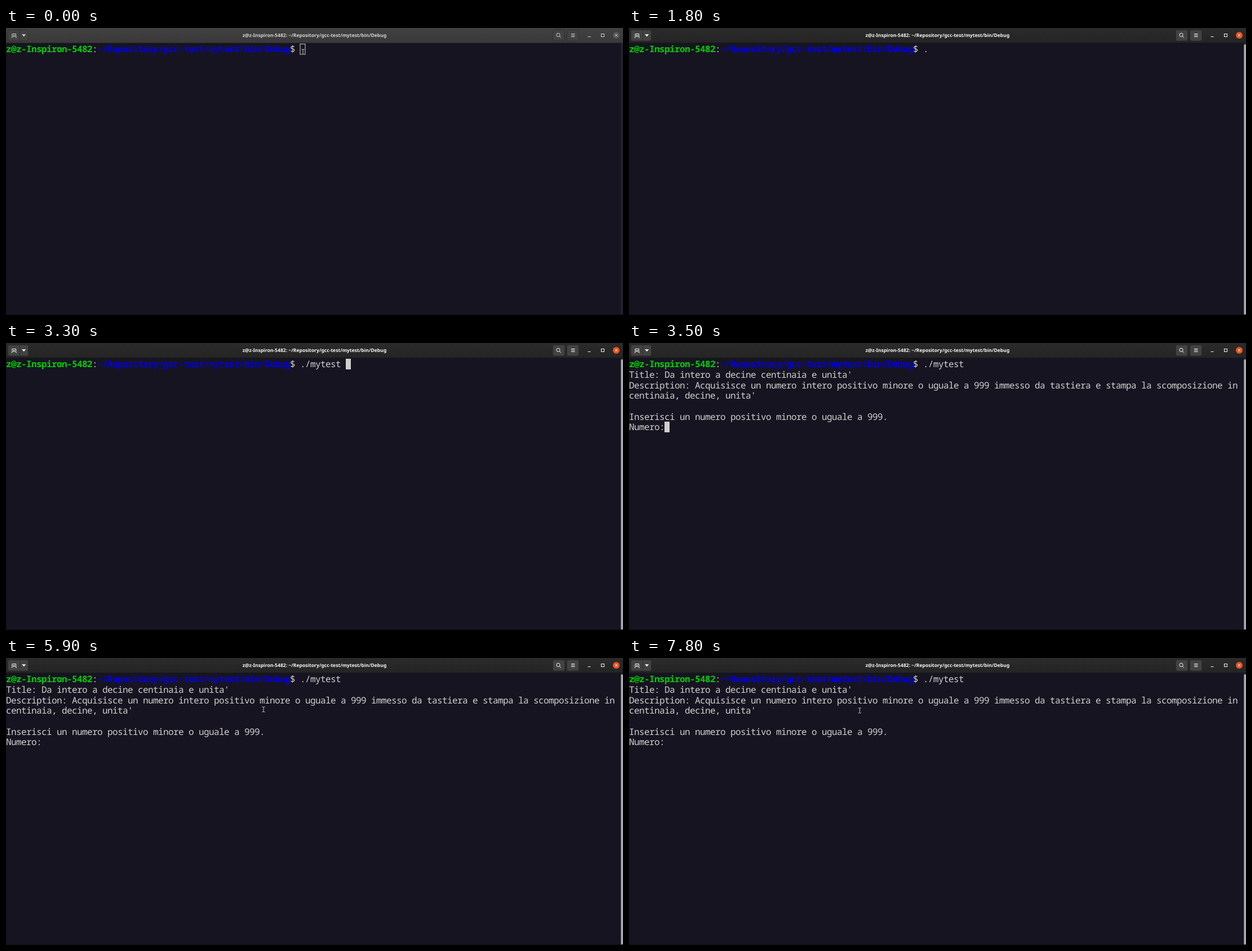
Write an HTML page that moves like this. It is 1095 px wide and 511 px high and loops after 8 s.

```html
<!DOCTYPE html>
<html lang="it">
<head>
<meta charset="utf-8">
<title>Terminal</title>
<style>
  html, body { margin: 0; width: 100%; height: 100%; overflow: hidden; background: #171421; }
  svg { display: block; width: 1095px; height: 511px; }
  text { text-rendering: geometricPrecision; white-space: pre; }
  .mono { font: 16px "Noto Sans Mono", monospace; letter-spacing: -0.6px; fill: #d0cfcc; }
  .bold { font-weight: 700; }
  .title { font: 700 8.57px "Noto Sans", sans-serif; text-anchor: middle; }
  .line { fill: none; stroke: currentColor; stroke-width: 1; }
</style>
</head>
<body>
<svg viewBox="0 0 1095 511" xmlns="http://www.w3.org/2000/svg">
  <defs>
    <linearGradient id="bar" x1="0" y1="0" x2="0" y2="1">
      <stop id="barTop" offset="0"/>
      <stop id="barEnd" offset="1"/>
    </linearGradient>
  </defs>
  <rect width="1095" height="511" fill="#171421"/>

  <g id="header">
    <rect width="1095" height="27" fill="url(#bar)"/>
    <rect id="edge" y="26" width="1095" height="1"/>
    <g id="buttons">
      <rect x="3.5" y="3.5" width="36" height="19.5" rx="3"/>
      <rect x="970.5" y="3.5" width="21" height="19.5" rx="3"/>
      <rect x="995.5" y="3.5" width="21" height="19.5" rx="3"/>
      <path d="M24.5 3.5V23"/>
    </g>
    <path class="line" d="M9.5 17H11V10.5H17.5V17H19M14.2 12V16.4M12 14.2H16.4"/>
    <path d="M28 11.3H35.4L31.7 15.2Z" fill="currentColor"/>
    <circle class="line" cx="980" cy="12.4" r="3.1"/>
    <path class="line" d="M982.3 14.7L985 17.3"/>
    <path class="line" d="M1003 10.5H1009.5M1003 13H1009.5M1003 15.5H1009.5"/>
    <path class="line" d="M1032.5 15.5H1037.5"/>
    <rect class="line" x="1056.5" y="10.5" width="5" height="5"/>
    <circle id="close" cx="1083" cy="13" r="6"/>
    <path class="line" d="M1080.9 10.9L1085.1 15.1M1085.1 10.9L1080.9 15.1"/>
    <text class="title" x="547.5" y="16" fill="currentColor">z@z-Inspiron-5482: ~/Repository/gcc-test/mytest/bin/Debug</text>
  </g>

  <rect x="1091" y="27" width="4" height="484" fill="#25222d"/>
  <rect id="thumb" x="1091.3" y="29" width="3.7" height="482" rx="1.8" fill="#aaa9ab"/>
  <rect y="510" width="1095" height="1" fill="#0f0d16"/>

  <rect id="caret"/>
  <g id="rows"></g>
  <g id="mouse" fill="none">
    <path d="M-2.6 -4.5H-1L0 -3.8L1 -4.5H2.6M0 -3.8V3.8M-2.6 4.5H-1L0 3.8L1 4.5H2.6" stroke="#1a1a1a" stroke-width="2.2"/>
    <path d="M-2.6 -4.5H-1L0 -3.8L1 -4.5H2.6M0 -3.8V3.8M-2.6 4.5H-1L0 3.8L1 4.5H2.6" stroke="#d8d8d8" stroke-width="0.9"/>
  </g>
</svg>
<script>
  const LOOP = 8000, COL = 9, ROW = 18.67, TOP = 28, BASE = 43.4;
  const PROMPT = [
    ["z@z-Inspiron-5482", "#00cd00", true],
    [":", "#d0cfcc", false],
    ["~/Repository/gcc-test/mytest/bin/Debug", "#0000e4", true],
    ["$ ", "#d0cfcc", false]
  ];
  const OUTPUT = [
    "Title: Da intero a decine centinaia e unita'",
    "Description: Acquisisce un numero intero positivo minore o uguale a 999 immesso da tastiera e stampa la scomposizione in",
    "centinaia, decine, unita'",
    "",
    "Inserisci un numero positivo minore o uguale a 999.",
    "Numero:"
  ];
  const TYPED = [[0, ""], [1200, "."], [2500, "./"], [3300, "./mytest "]];
  const RUN = 3500;
  const DARK = [[1100, 1200], [1800, 2300], [3100, 3300], [4200, 4800], [5400, 6000], [6600, 7200], [7800, 8000]];
  const THEMES = [
    { from: 0, top: "#414141", end: "#393939", edge: "#2a2a2a", btn: "#414141", rim: "#303030", ink: "#d2d2d2", close: "#575757" },
    { from: 500, top: "#303030", end: "#292929", edge: "#1d1d1d", btn: "#3e3e3e", rim: "#292929", ink: "#f0f0f0", close: "#dc4e1e" },
    { from: 600, top: "#2b2b2b", end: "#242424", edge: "#181818", btn: "#424242", rim: "#2d2d2d", ink: "#f7f7f7", close: "#e95420" }
  ];

  const $ = id => document.getElementById(id);
  const set = (el, attrs) => { for (const k in attrs) el.setAttribute(k, attrs[k]); };
  const rows = $("rows");

  function addText(str, col, row, color, bold) {
    const el = document.createElementNS("http://www.w3.org/2000/svg", "text");
    set(el, { class: bold ? "mono bold" : "mono", x: col * COL, y: BASE + row * ROW });
    if (color) el.style.fill = color;
    el.textContent = str;
    rows.appendChild(el);
    return el;
  }

  let start = 0;
  for (const [str, color, bold] of PROMPT) {
    addText(str, start, 0, color, bold);
    start += str.length;
  }
  const command = addText("", start, 0);
  const output = OUTPUT.map((str, i) => addText(str, 0, i + 1));

  const latest = (list, t, key) => list.filter(item => item[key] <= t).pop();

  // Pointer position, or null while typing hides it.
  function pointer(t) {
    if (t < 1300) return [527, 42.5];
    if (t < 5300) return null;
    if (t < 6000) {
      const k = (Math.floor(t / 100) * 100 - 5300) / 600;
      return [521 - 64 * k ** 1.5, 54.5 + 37 * k];
    }
    if (t < 6200) return [426, 93.5];
    if (t < 6600) return [422.5, 93.5];
    return t < 6700 ? [414, 93.5] : [409.5, 93.5];
  }

  function render(t) {
    const focused = t >= 500, running = t >= RUN;

    const c = latest(THEMES, t, "from");
    set($("barTop"), { "stop-color": c.top });
    set($("barEnd"), { "stop-color": c.end });
    set($("edge"), { fill: c.edge });
    set($("buttons"), { fill: c.btn, stroke: c.rim });
    set($("close"), { fill: c.close });
    set($("header"), { color: c.ink });
    set($("thumb"), { visibility: focused ? "visible" : "hidden" });

    const typed = latest(TYPED, t, 0)[1];
    command.textContent = typed;
    output.forEach(el => set(el, { visibility: running ? "visible" : "hidden" }));

    const col = running ? OUTPUT[OUTPUT.length - 1].length : start + typed.length;
    const x = col * COL, y = TOP + (running ? OUTPUT.length * ROW : 0);
    const lit = !DARK.some(([a, b]) => t >= a && t < b);
    set($("caret"), focused
      ? { x, y, width: 9, height: 19, fill: "#d0cfcc", stroke: "none" }
      : { x: x + 0.5 - 0.5, y: y + 0.5, width: 9, height: 18.5, fill: "none", stroke: "#d0cfcc" });
    set($("caret"), { visibility: lit ? "visible" : "hidden" });

    const p = pointer(t);
    set($("mouse"), { visibility: p ? "visible" : "hidden" });
    if (p) set($("mouse"), { transform: `translate(${p[0]} ${p[1]})` });
  }

  const begin = performance.now();
  function tick() {
    render((performance.now() - begin) % LOOP);
    requestAnimationFrame(tick);
  }
  tick();
</script>
</body>
</html>
```
